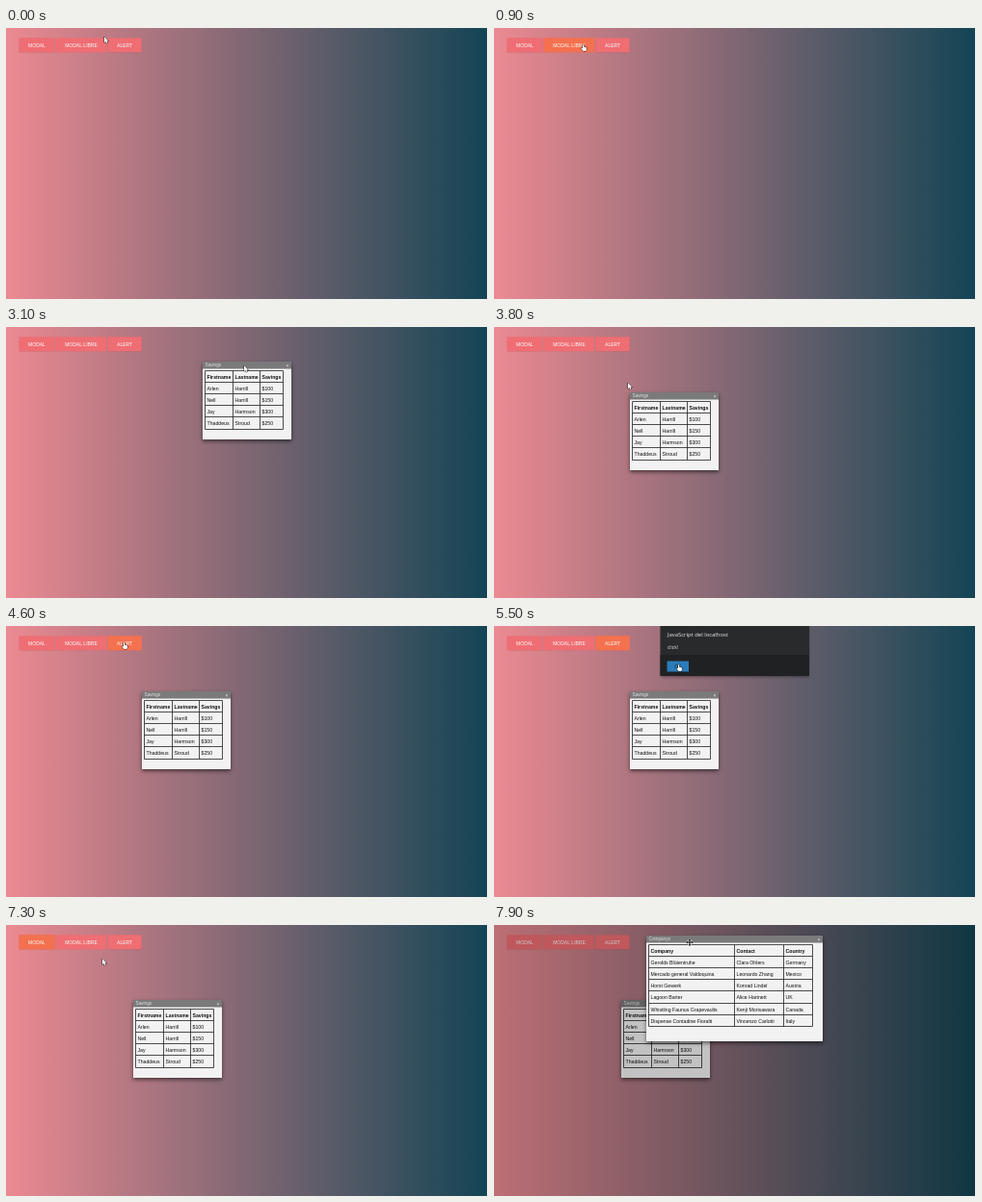
Animation of 500 by 282 pixels, one loop 8 s. Source, as an HTML page with a canvas:

```html
<!DOCTYPE html>
<html lang="en">
<head>
<meta charset="utf-8">
<title>Draggable modals</title>
<style>
html, body { margin: 0; height: 100%; overflow: hidden; }
canvas { display: block; }
</style>
</head>
<body>
<canvas id="stage" width="500" height="282"></canvas>
<script>
const ctx = document.getElementById('stage').getContext('2d');
const LOOP = 8000, STEP = 100;
const SANS = '"Liberation Sans", Arial, sans-serif';
const UI = '"Open Sans", sans-serif';

// Pointer path: time, x, y
const path = [
  [0, 102, 9], [200, 118, 16], [500, 30, 17], [800, 92, 17], [1099, 92, 17],
  [1100, 216, 189], [1600, 216, 189], [1800, 370, 197], [2100, 41, 59],
  [2400, 80, 17], [2700, 80, 17], [3100, 247, 40], [3500, 247, 40],
  [3700, 184, 72], [3800, 139, 58], [4000, 25, 42], [4300, 122, 17],
  [4700, 122, 17], [5200, 191, 40], [5600, 191, 40], [5900, 186, 72],
  [6200, 186, 72], [6300, 186, 75], [6500, 177, 82], [6600, 177, 82],
  [7000, 30, 17], [7200, 30, 17], [7300, 100, 35], [7500, 203, 57],
  [7900, 203, 18]
];

const buttons = [
  { label: 'MODAL', x: 13.5, w: 37 },
  { label: 'MODAL LIBRE', x: 51.8, w: 52.4 },
  { label: 'ALERT', x: 105.5, w: 35.2 }
];

const savings = {
  title: 'Savings', w: 92, h: 81, cols: [2.5, 31.5, 59.5, 83.5],
  rows: [
    ['Firstname', 'Lastname', 'Savings'],
    ['Arlen', 'Harrill', '$100'],
    ['Nell', 'Harrill', '$150'],
    ['Jay', 'Harmson', '$300'],
    ['Thaddeus', 'Stroud', '$250']
  ]
};

const companies = {
  title: 'Companys', w: 183, h: 110, cols: [2.5, 91.5, 142.5, 172.5],
  rows: [
    ['Company', 'Contact', 'Country'],
    ['Gerolds Blütentruhe', 'Clara Ohlers', 'Germany'],
    ['Mercado general Valdoquina', 'Leonardo Zhang', 'Mexico'],
    ['Horst Gewerk', 'Konrad Lindel', 'Austria'],
    ['Lagoon Barter', 'Alice Hartnett', 'UK'],
    ['Whistling Faunus Grapevaults', 'Kenji Morisawara', 'Canada'],
    ['Dispense Contadine Fioralti', 'Vincenzo Carlotti', 'Italy']
  ]
};

function pointer(t) {
  const i = path.findIndex(p => p[0] > t);
  if (i < 0) return path[path.length - 1].slice(1);
  if (i === 0) return path[0].slice(1);
  const [t0, x0, y0] = path[i - 1], [t1, x1, y1] = path[i];
  const k = (t - t0) / (t1 - t0);
  return [x0 + (x1 - x0) * k, y0 + (y1 - y0) * k];
}

// Distance the pointer has covered within a drag
function dragged(t, from, to) {
  const [x0, y0] = pointer(from);
  const [x, y] = pointer(Math.min(Math.max(t, from), to));
  return [Math.round(x - x0), Math.round(y - y0)];
}

const inside = ([px, py], x, y, w, h) => px >= x && px < x + w && py >= y && py < y + h;

function rect(x, y, w, h, color) {
  ctx.fillStyle = color;
  ctx.fillRect(x, y, w, h);
}

function text(str, x, y, font, color, align = 'left') {
  ctx.font = font;
  ctx.fillStyle = color;
  ctx.textAlign = align;
  ctx.fillText(str, x, y);
}

function shadow(color, blur, dy) {
  ctx.shadowColor = color;
  ctx.shadowBlur = blur;
  ctx.shadowOffsetY = dy;
}

function drawBackground() {
  const g = ctx.createLinearGradient(0, 0, 500, 0);
  g.addColorStop(0, '#ec8a92');
  g.addColorStop(1, '#134454');
  rect(0, 0, 500, 282, g);
}

function drawButton(b, t) {
  const hit = at => {
    const alertOpen = at >= 4700 && at < 5700;
    return inside(pointer(alertOpen ? 4700 : at), b.x, 10, b.w, 15.5) ? 1 : 0;
  };
  const heat = Math.max(hit(t), hit(t - 100), hit(t - 200) / 2);
  shadow('rgba(60,20,30,.3)', 1.5, 0.4);
  rect(b.x, 10.3, b.w, 15, '#ee6e73');
  shadow('transparent', 0, 0);
  ctx.globalAlpha = heat;
  rect(b.x, 10.3, b.w, 15, '#f4714f');
  ctx.globalAlpha = 1;
  text(b.label, b.x + b.w / 2, 19.6, '5px ' + SANS, '#fff', 'center');
}

function drawWindow({ title, w, h, cols, rows }, x, y) {
  shadow('rgba(0,0,0,.55)', 4, 1.5);
  rect(x, y, w, h, '#f2f2f2');
  shadow('transparent', 0, 0);
  rect(x, y, w, 7.5, '#7a7a7a');
  text(title, x + 2.5, y + 5.2, '4.7px ' + SANS, '#e4e4e4');
  text('×', x + w - 4, y + 5.6, '5px ' + SANS, '#eee', 'center');

  const rowY = i => y + 9.5 + Math.round(12.1 * i);
  const right = cols[cols.length - 1];
  ctx.beginPath();
  for (let i = 0; i <= rows.length; i++) {
    ctx.moveTo(x + cols[0], rowY(i));
    ctx.lineTo(x + right, rowY(i));
  }
  for (const c of cols) {
    ctx.moveTo(x + c, rowY(0));
    ctx.lineTo(x + c, rowY(rows.length));
  }
  ctx.lineWidth = 0.8;
  ctx.strokeStyle = '#222';
  ctx.stroke();
  rows.forEach((row, i) => row.forEach((cell, j) =>
    text(cell, x + cols[j] + 2, rowY(i) + 8, (i ? '' : 'bold ') + '5.2px ' + SANS, '#111')));
}

function drawAlert(t) {
  shadow('rgba(0,0,0,.4)', 3, 1);
  rect(172.5, 0, 154.5, 52, '#292a2c');
  shadow('transparent', 0, 0);
  rect(172.5, 30, 154.5, 22, '#202123');
  text('JavaScript del localhost', 180, 11, '5.9px ' + UI, '#eee');
  text('click!', 180, 24.2, '4.9px ' + UI, '#eee');
  rect(179.5, 36.5, 22.5, 11, t >= 5300 ? '#2b7cb8' : '#3a8fce');
  text('OK', 190.7, 43.8, '4.8px ' + UI, '#10222e', 'center');
}

const shapes = {
  arrow: new Path2D('M0 0V6.2L1.4 5L2.3 7L3.3 6.5L2.5 4.6H4.3Z'),
  hand: new Path2D('M0 .6Q.6-.3 1.2.6V2.8L4 3.4V5.2L3.3 7H.6L-1.6 4.3L-1 3.6L0 4.2Z'),
  move: new Path2D('M0-4L1.5-2.3H.5V-.5H2.3V-1.5L4 0L2.3 1.5V.5H.5V2.3H1.5L0 4L-1.5 2.3H-.5V.5H-2.3V1.5L-4 0L-2.3-1.5V-.5H-.5V-2.3H-1.5Z')
};

function drawPointer(t) {
  const pos = pointer(t);
  const alertOpen = t >= 4700 && t < 5700;
  const onButton = alertOpen
    ? inside(pos, 179.5, 36.5, 22.5, 11)
    : buttons.some(b => inside(pos, b.x, 10, b.w, 15.5));
  const kind = t >= 7500 ? 'move' : onButton ? 'hand' : 'arrow';
  ctx.save();
  ctx.translate(...pos);
  ctx.lineWidth = 0.9;
  ctx.lineJoin = 'round';
  ctx.strokeStyle = kind === 'move' ? '#fff' : '#111';
  ctx.fillStyle = kind === 'move' ? '#111' : '#fff';
  ctx.stroke(shapes[kind]);
  ctx.fill(shapes[kind]);
  ctx.restore();
}

function draw(t) {
  drawBackground();
  buttons.forEach(b => drawButton(b, t));
  if (t >= 2700) {
    const [ax, ay] = dragged(t, 3500, 3700);
    const [bx, by] = dragged(t, 6200, 6500);
    drawWindow(savings, 204 + ax + bx, 36 + ay + by);
  }
  if (t >= 7400) {
    rect(0, 0, 500, 282, 'rgba(0,0,0,.2)');
    const [dx, dy] = dragged(t, 7500, 7900);
    drawWindow(companies, 158 + dx, 50 + dy);
  }
  if (t >= 4700 && t < 5700) drawAlert(t);
  drawPointer(t);
  rect(499, 0, 1, 282, '#f4f4f4');
}

const start = performance.now();
function frame() {
  const t = (performance.now() - start) % LOOP;
  draw(Math.floor(t / STEP) * STEP);
  requestAnimationFrame(frame);
}
frame();
</script>
</body>
</html>
```
